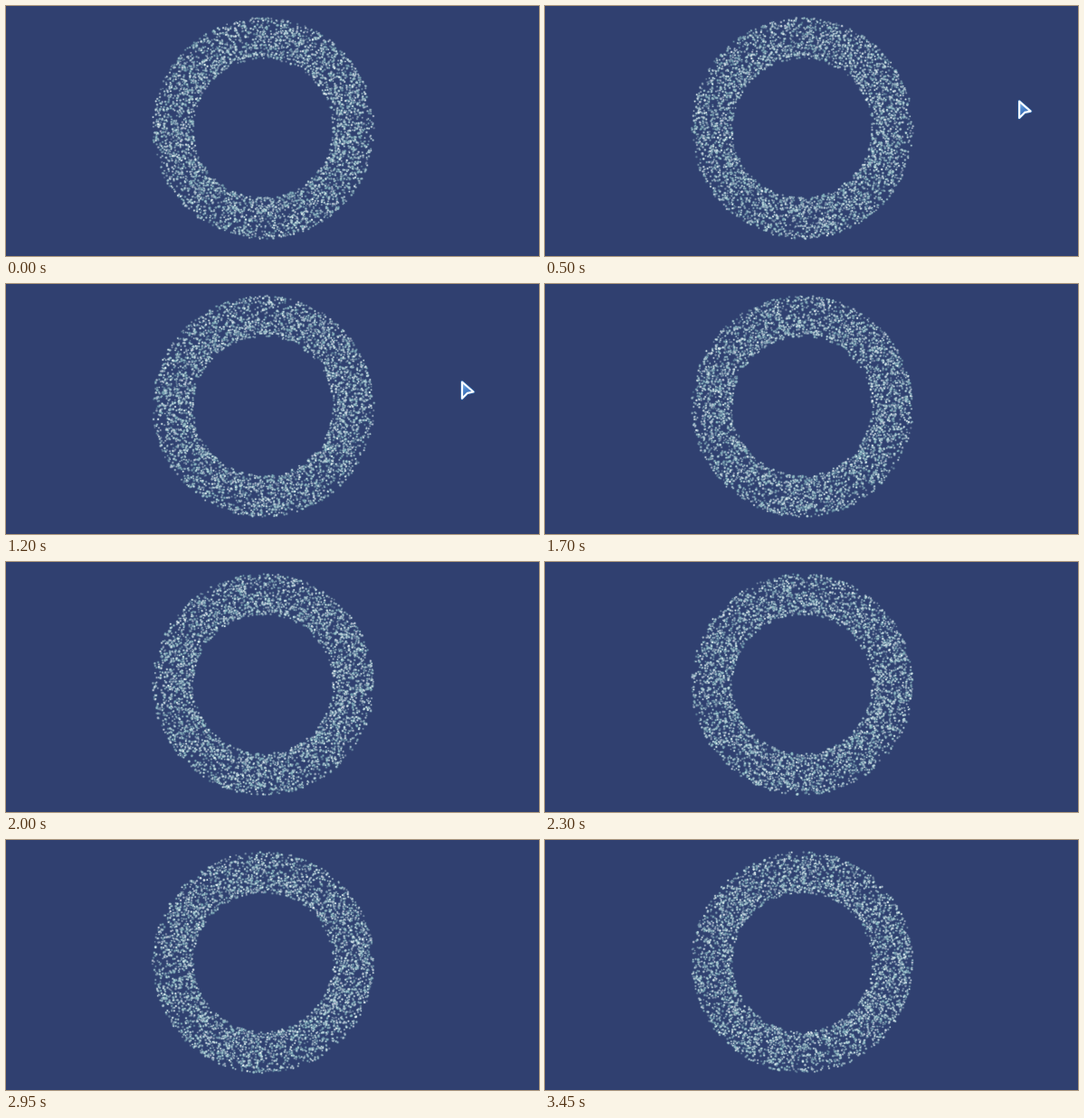
An HTML page with a canvas for the animation above (3500 ms loop, 589 by 277 pixels).

```html
<!DOCTYPE html>
<html lang="en">
<head>
<meta charset="utf-8">
<title>Particle ring</title>
<style>
  html, body { margin: 0; width: 100%; height: 100%; overflow: hidden; background: #304070; }
  canvas { display: block; }
</style>
</head>
<body>
<canvas id="stage" width="589" height="277"></canvas>
<script>
const ctx = document.getElementById('stage').getContext('2d');
const LOOP = 3500, STEP = 50, START = 150;
const CX = 284.3, CY = 135.5, INNER = 77, OUTER = 122.5, COUNT = 4000;
const COLORS = ['#f4f8fa', '#dce8ec', '#c3d8e0', '#a6c8d0', '#8cb8c2', '#d2cfe2'];

let seed = 7;
function random() {
  seed = (seed * 1664525 + 1013904223) >>> 0;
  return seed / 4294967296;
}

const dots = Array.from({ length: COUNT }, () => ({
  angle: random() * Math.PI * 2,
  radius: INNER + (OUTER - INNER) * random(),
  speed: 0.12 + 0.3 * random(),
  size: 0.75 + 0.45 * random(),
  alpha: 0.3 + 0.55 * random(),
  color: COLORS[Math.floor(random() * COLORS.length)]
}));

// Pointer path: time, x, y
const PATH = [[50, 569, 97], [150, 569, 97], [700, 502, 106.5], [1300, 502, 106.5], [1650, 547, -24]];

function pointerAt(t) {
  for (let i = 1; i < PATH.length; i++) {
    const [t0, x0, y0] = PATH[i - 1], [t1, x1, y1] = PATH[i];
    if (t >= t0 && t <= t1) {
      const p = (t - t0) / (t1 - t0), e = p * p * (3 - 2 * p);
      return [x0 + (x1 - x0) * e, y0 + (y1 - y0) * e];
    }
  }
  return null;
}

const arrow = new Path2D('M2 2 L14.5 13 L8 14.3 L2 20.3 Z');
const fill = ctx.createLinearGradient(2, 2, 10, 18);
fill.addColorStop(0, '#8ec0ee');
fill.addColorStop(0.5, '#4d86cc');
fill.addColorStop(1, '#2c5eaa');

function drawPointer(x, y) {
  ctx.save();
  ctx.translate(x, y);
  ctx.lineJoin = 'round';
  ctx.lineWidth = 4;
  ctx.strokeStyle = 'rgba(42, 100, 170, 0.75)';
  ctx.stroke(arrow);
  ctx.fillStyle = fill;
  ctx.fill(arrow);
  ctx.lineWidth = 2.2;
  ctx.strokeStyle = '#f6fbff';
  ctx.stroke(arrow);
  ctx.restore();
}

function disc(x, y, r, alpha) {
  ctx.globalAlpha = alpha;
  ctx.beginPath();
  ctx.arc(x, y, r, 0, Math.PI * 2);
  ctx.fill();
}

function draw(t) {
  ctx.fillStyle = '#304070';
  ctx.fillRect(0, 0, 589, 277);
  const turn = Math.max(0, t - START) / 1000;
  for (const d of dots) {
    const a = d.angle + d.speed * turn;
    const x = CX + d.radius * Math.cos(a), y = CY + d.radius * Math.sin(a);
    ctx.fillStyle = '#7fb4bc';
    disc(x, y, d.size + 0.8, d.alpha * 0.28);
    ctx.fillStyle = d.color;
    disc(x, y, d.size, d.alpha);
  }
  ctx.globalAlpha = 1;
  const pos = pointerAt(t);
  if (pos) drawPointer(...pos);
}

const begin = performance.now();
let last = -1;
function tick() {
  const elapsed = Math.max(0, performance.now() - begin) % LOOP;
  const t = Math.floor(elapsed / STEP) * STEP;
  if (t !== last) draw(last = t);
  requestAnimationFrame(tick);
}
tick();
</script>
</body>
</html>
```
